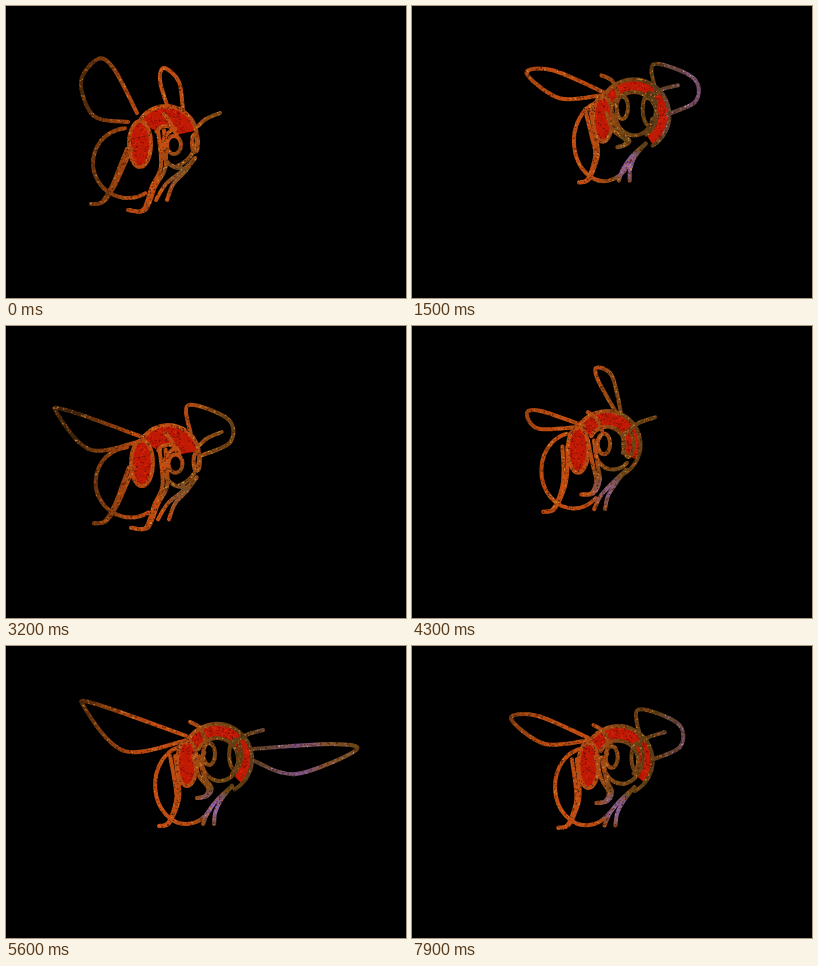
An HTML page with a canvas that plays this animation: 400x292 px, repeating every 8 s.

```html
<!DOCTYPE html>
<html lang="en">
<head>
<meta charset="utf-8">
<title>Glitter bee</title>
<style>
  html, body { margin: 0; width: 100%; height: 100%; overflow: hidden; background: #000; }
  canvas { display: block; }
</style>
</head>
<body>
<canvas id="stage" width="400" height="292"></canvas>
<script>
const W = 400, H = 292, TICK = 100, LOOP = 8000, TURN = 17, LINE = 4;
const ctx = document.getElementById('stage').getContext('2d');

const parse = text => text.split(' ').map(pair => pair.split(',').map(Number));
const lerp = (a, b, k) => a + (b - a) * k;

// Each part has a near and a far pose; the flight blends between them.
// Arcs: centre x, y, radii, start and end in degrees.
const ARCS = {
  head: [[160, 131, 31, 31, -150, 70], [211, 113, 35, 35, -152, 60]],
  band: [[160, 131, 21, 21, -150, -12], [211, 113, 28, 28, -152, 45]],
  lobe: [[134, 138, 11, 23, 0, 360], [181, 117, 10, 23, 0, 360]],
  tail: [[122, 157, 35, 35, 60, 265], [180, 139, 31, 39, 40, 255]],
  face: [[174, 142, 18, 20, 85, 255], [214, 116, 18, 19, 20, 210]],
  eyeL: [[168, 139, 7, 9, 0, 360], [203, 108, 6, 11, 0, 360]],
  eyeR: [[189, 137, 3, 9, 0, 360], [229, 109, 6, 15, 0, 360]]
};
const PATHS = {
  feeler: ['192,120 200,113 214,107', '228,97 240,89 257,84'],
  crest: ['158,108 164,116 169,126', '184,76 194,82 200,95'],
  hindLeg: ['121,143 114,160 106,180 96,196 85,198', '164,110 169,138 170,155 162,177 153,180'],
  midLeg: ['152,124 155,160 146,180 137,204 122,204', '187,110 193,130 202,142 199,150 191,152'],
  foreLeg: ['189,152 176,165 160,178 150,194', '226,140 212,153 202,166 197,178']
};
for (const name in PATHS) PATHS[name] = PATHS[name].map(parse);

// Gap between the two lines of a limb, at its top and at its foot.
const LIMBS = { hindLeg: [5, 0], midLeg: [6, 1], foreLeg: [0, 11] };

// Left and right wing loops, measured from the middle of the head.
const WINGS = {
  raised: ['-29,-24 -52,-68 -68,-78 -85,-55 -72,-21 -38,-15', '2,-29 -6,-56 -2,-69 13,-55 17,-25'],
  lifted: ['-23,-19 -67,-34 -80,-31 -68,-16 -25,-18', '10,-31 -9,-65 -10,-77 5,-69 14,-33'],
  level: ['-50,-16 -72,-23 -66,-45 -42,-58 -29,-39 -24,-25', '37,-7 100,-17 137,-3 115,17 80,29 38,12'],
  folded: ['-30,-23 -81,-45 -107,-42 -74,-17 -32,-20', '23,-21 20,-51 60,-37 62,-14 34,-1'],
  wide: ['-31,-23 -121,-55 -133,-52 -93,-8 -33,-18', '36,-10 114,-15 139,-9 79,15 37,2']
};
for (const name in WINGS) WINGS[name] = WINGS[name].map(parse);

// Three beats per flap on the near side, two on the far side.
function wingsAt(step) {
  if (step > 9) return step % 2 ? ['folded', 'folded'] : ['wide', 'wide'];
  const up = step < 5 ? 'raised' : 'lifted';
  return [[up, up], ['level', 'level'], ['wide', 'folded']][step % 3];
}

// Distance flown: 0 at the near pose, 1 at the far pose, a little beyond at the turn.
const flight = step => (1 - Math.cos(Math.PI * step / TURN)) / 1.6;

const arcAt = (name, k) => ARCS[name][0].map((v, i) => lerp(v, ARCS[name][1][i], k));
const pathAt = (name, k) => PATHS[name][0].map((p, i) =>
  p.map((v, j) => lerp(v, PATHS[name][1][i][j], k)));

function layer() {
  const c = document.createElement('canvas');
  c.width = W;
  c.height = H;
  const g = c.getContext('2d');
  g.lineCap = g.lineJoin = 'round';
  return g;
}

function speckle(count, pick) {
  const g = layer();
  let seed = 7;
  const rand = () => (seed = seed * 16807 % 2147483647) / 2147483647;
  for (let i = 0; i < count; i++) {
    const x = 45 + rand() * 325, y = 35 + rand() * 180, size = .7 + rand() * .8;
    const colors = pick(x);
    g.fillStyle = colors[Math.floor(rand() * colors.length)];
    g.fillRect(x, y, size, size);
  }
  return g.canvas;
}

const DARK = ['#321604', '#4c2006', '#662c0a'];
const WARM = [...DARK, '#9c420c', '#d05c14', '#d89838'];
const COOL = [...DARK, '#8a6428', '#9068c0', '#c0a0e0'];
const glitter = speckle(13000, x => x > 250 ? COOL : WARM);
const grain = speckle(14000, () => ['#8c0c02', '#a81404', '#e42c0c', '#6c0a02', '#c81a04']);

const red = layer(), lines = layer();
const tone = lines.createLinearGradient(70, 0, 350, 0);
['#3c230a', '#7a3a0e', '#b4460f', '#c44c10', '#b84a12', '#764614',
  '#583c14', '#65443c', '#7a5084', '#84502a', '#6e4816']
  .forEach((color, i, all) => tone.addColorStop(i / (all.length - 1), color));
lines.strokeStyle = tone;

// Smooth curve through the points.
function strokePath(pts) {
  const at = i => pts[Math.max(0, Math.min(pts.length - 1, i))];
  lines.lineWidth = LINE;
  lines.beginPath();
  lines.moveTo(...pts[0]);
  for (let i = 0; i < pts.length - 1; i++) {
    const [a, b, c, d] = [at(i - 1), at(i), at(i + 1), at(i + 2)];
    lines.bezierCurveTo(b[0] + (c[0] - a[0]) / 6, b[1] + (c[1] - a[1]) / 6,
      c[0] - (d[0] - b[0]) / 6, c[1] - (d[1] - b[1]) / 6, c[0], c[1]);
  }
  lines.stroke();
}

function traceArc(g, [x, y, rx, ry, from, to], inset = 0) {
  const rad = Math.PI / 180;
  g.beginPath();
  g.ellipse(x, y, rx - inset, ry - inset, 0, from * rad, to * rad);
}

function strokeLimb(name, k) {
  const pts = pathAt(name, k), [top, foot] = LIMBS[name];
  strokePath(pts);
  strokePath(pts.map(([x, y], i) => [x + lerp(top, foot, i / (pts.length - 1)), y]));
}

function tint([x, y], radius, rgb, alpha) {
  const g = lines.createRadialGradient(x, y, 0, x, y, radius);
  g.addColorStop(0, `rgba(${rgb},${alpha})`);
  g.addColorStop(.5, `rgba(${rgb},${alpha * .7})`);
  g.addColorStop(1, `rgba(${rgb},0)`);
  lines.fillStyle = g;
  lines.fillRect(x - radius, y - radius, radius * 2, radius * 2);
}

function wipe(g) {
  g.globalCompositeOperation = 'source-over';
  g.clearRect(0, 0, W, H);
}

function drawRed(band, lobe, depth) {
  wipe(red);
  red.fillStyle = red.strokeStyle = '#c01a04';
  red.lineWidth = depth;
  red.lineCap = 'butt';
  traceArc(red, band);
  red.stroke();
  traceArc(red, lobe);
  red.fill();
  red.globalCompositeOperation = 'source-atop';
  red.drawImage(grain, 0, 0);
}

function drawLines(step, k, head, band, depth) {
  wipe(lines);
  wingsAt(step).forEach((pose, side) => {
    const size = pose === 'wide' ? Math.min(1, lerp(.83, 1, k)) : 1;
    strokePath(WINGS[pose][side].map(([x, y]) => [head[0] + x * size, head[1] + y * size]));
  });
  for (const name of ['tail', 'lobe', 'face', 'eyeL', 'eyeR', 'head']) {
    lines.lineWidth = LINE;
    traceArc(lines, arcAt(name, k));
    lines.stroke();
  }
  traceArc(lines, band, depth / 2);
  lines.stroke();
  for (const name in LIMBS) strokeLimb(name, k);
  strokePath(pathAt('feeler', k));
  strokePath(pathAt('crest', k));

  lines.globalCompositeOperation = 'source-atop';
  const claw = pathAt('foreLeg', k)[1];
  tint(claw, 30, '92,72,24', .8);
  tint([claw[0] - 4, claw[1] + 8], 20, '150,105,205', Math.min(.85, .1 + .8 * k));
  lines.globalAlpha = .85;
  lines.drawImage(glitter, 0, 0);
  lines.globalAlpha = 1;
}

function draw(step) {
  const k = flight(step), head = arcAt('head', k), band = arcAt('band', k);
  const depth = 2 * (head[2] - band[2]);
  drawRed(band, arcAt('lobe', k), depth);
  drawLines(step, k, head, band, depth);
  ctx.fillStyle = '#000';
  ctx.fillRect(0, 0, W, H);
  ctx.drawImage(red.canvas, 0, 0);
  ctx.drawImage(lines.canvas, 0, 0);
}

// The flight runs out and back again in hard steps.
const start = performance.now();
let shown = -1;
function frame() {
  const elapsed = Math.max(0, performance.now() - start) % LOOP;
  const beat = Math.floor(elapsed / TICK) % (TURN * 2);
  const step = beat > TURN ? TURN * 2 - beat : beat;
  if (step !== shown) draw(shown = step);
  requestAnimationFrame(frame);
}
frame();
</script>
</body>
</html>
```
